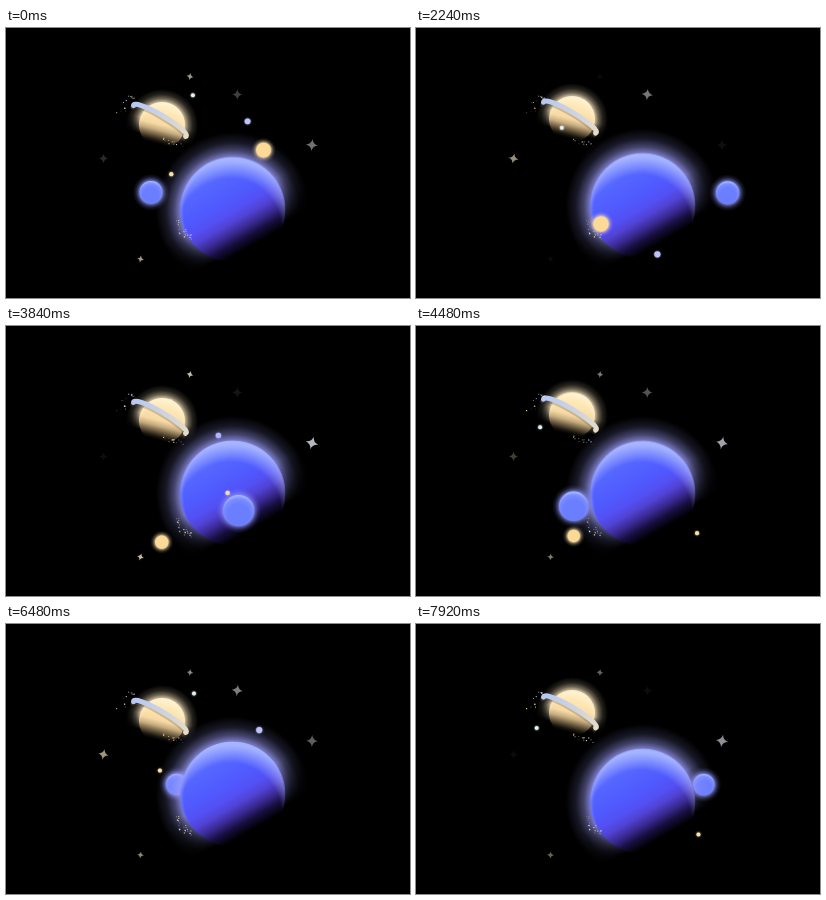
These frames come from a looping animation (404 px wide and 270 px high, 8 s). An HTML page with a canvas:

```html
<!DOCTYPE html>
<html lang="en">
<head>
<meta charset="utf-8">
<title>Planets</title>
<style>
html, body { margin: 0; width: 100%; height: 100%; overflow: hidden; background: #000; }
canvas { display: block; width: 404px; height: 270px; }
</style>
</head>
<body>
<canvas id="c" width="404" height="270"></canvas>
<script>
const ctx = document.getElementById('c').getContext('2d');
const { PI, sin, cos, max, abs } = Math;
const TAU = 2 * PI, LOOP = 8, STEP = 0.08;

function fillStops(g, stops) {
  for (const [at, color] of stops) g.addColorStop(at, color);
  return g;
}

function disc(c, x, y, r, fill) {
  c.fillStyle = fill;
  c.beginPath();
  c.arc(x, y, r, 0, TAU);
  c.fill();
}

function halo(c, x, y, r, reach, rgb, alpha) {
  const g = c.createRadialGradient(x, y, r * 0.97, x, y, r + reach);
  disc(c, x, y, r + reach, fillStops(g, [
    [0, `rgba(${rgb},${alpha})`], [0.3, `rgba(${rgb},${alpha * 0.5})`],
    [0.6, `rgba(${rgb},${alpha * 0.18})`], [1, `rgba(${rgb},0)`]
  ]));
}

// Gradient across a disc of radius r at the origin, along direction (nx, ny)
const across = (c, r, nx, ny, stops) =>
  fillStops(c.createLinearGradient(-nx * r, -ny * r, nx * r, ny * r), stops);

// Prerendered sphere: halo kept on the lit side, opaque body, soft rim
function sphere({ r, reach, dir, rgb, glow, body, rim, night }) {
  const half = Math.ceil(r + reach) + 2;
  const layer = document.createElement('canvas');
  layer.width = layer.height = half * 2;
  const c = layer.getContext('2d');
  c.translate(half, half);
  halo(c, 0, 0, r, reach, rgb, glow);
  c.globalCompositeOperation = 'destination-in';
  c.fillStyle = across(c, r, ...dir, [[0, '#000'], [0.45, '#000'], [night, 'transparent']]);
  c.fillRect(-half, -half, half * 2, half * 2);
  c.globalCompositeOperation = 'source-over';
  disc(c, 0, 0, r, across(c, r, ...dir, body));
  c.globalCompositeOperation = 'source-atop';
  for (const [dx, dy, inner, outer, rgba] of rim) {
    const g = c.createRadialGradient(dx, dy, inner, dx, dy, outer);
    const clear = rgba.replace(/[^,]+\)$/, '0)');
    disc(c, 0, 0, r, fillStops(g, [[0, clear], [1, rgba]]));
  }
  return (x, y) => ctx.drawImage(layer, x - half, y - half);
}

const drawPlanet = sphere({
  r: 52.5, reach: 25, dir: [0.5, 0.866], rgb: '160,160,255', glow: 0.85, night: 0.85,
  body: [[0, '#6c7dff'], [0.2, '#5566ff'], [0.4, '#505aff'], [0.52, '#5450f4'],
    [0.61, '#5142d2'], [0.7, '#3a2a92'], [0.79, '#180f40'], [0.89, '#000']],
  rim: [[-3, 21, 52, 70, 'rgba(178,192,255,0.85)'], [5, 4, 54, 59.5, 'rgba(170,180,255,0.6)']]
});

const drawSaturn = sphere({
  r: 23, reach: 13, dir: [-0.25, 0.97], rgb: '255,235,195', glow: 0.85, night: 0.8,
  body: [[0, '#fff0c8'], [0.3, '#fde4b0'], [0.5, '#f6d9a4'], [0.62, '#c8ad80'],
    [0.74, '#6c5c42'], [0.85, '#1a150e'], [0.92, '#000']],
  rim: [[-1, 5, 20, 29, 'rgba(255,246,220,0.6)']]
});

function drawRing(y) {
  ctx.save();
  ctx.translate(154, y);
  ctx.rotate(0.53);
  const arc = (dy, width, style) => {
    ctx.strokeStyle = style;
    ctx.lineWidth = width;
    ctx.beginPath();
    ctx.ellipse(0, dy, 30.5, 5.5, 0, PI - 0.1, TAU + 0.15);
    ctx.stroke();
  };
  ctx.lineCap = 'round';
  arc(2.5, 4, 'rgba(110,95,75,0.3)');
  arc(0, 5, fillStops(ctx.createLinearGradient(-32, 0, 32, 0), [
    [0, '#b6c8f4'], [0.35, '#c6d0e8'], [0.7, '#d4d6dc'], [1, '#e6dcc6']]));
  ctx.restore();
}

function drawBlue(x, y, r) {
  halo(ctx, x, y, r, 7, '140,150,255', 0.85);
  const g = ctx.createRadialGradient(x, y + r * 0.3, r * 0.7, x, y + r * 0.2, r * 1.2);
  disc(ctx, x, y, r, fillStops(g, [[0, '#6a7eff'], [0.6, '#7b8dff'], [1, '#acbcff']]));
}

function drawGold(x, y, r) {
  halo(ctx, x, y, r, 5, '255,226,170', 0.8);
  disc(ctx, x, y, r, '#fcd997');
}

function drawDot(x, y, r, color, rgb) {
  halo(ctx, x, y, r, 2, rgb, 0.4);
  disc(ctx, x, y, r, color);
}

function star(x, y, size, rgb, k) {
  const s = size * (0.85 + 0.15 * k), q = s * 0.14;
  ctx.save();
  ctx.translate(x, y);
  ctx.rotate(0.3 * max(0, k - 0.4) / 0.6);
  ctx.fillStyle = `rgba(${rgb},${0.05 + 0.78 * k})`;
  ctx.beginPath();
  ctx.moveTo(0, -s);
  for (const [cx, cy, ex, ey] of [[q, -q, s, 0], [q, q, 0, s], [-q, q, -s, 0], [-q, -q, 0, -s]])
    ctx.quadraticCurveTo(cx, cy, ex, ey);
  ctx.fill();
  ctx.restore();
}

// x, y, size, colour, period, time of the peak
const stars = [
  [184, 48.5, 3.6, '232,226,205', 3.3, 0.5],
  [231.3, 66.5, 6, '215,218,218', 4.3, 1.35],
  [306, 117, 6.5, '225,230,236', 3.3, 0.75],
  [97.5, 130.5, 5.4, '235,220,190', 4.3, 1.55],
  [134.5, 231, 3.6, '240,228,190', 3.3, 0.5]
];

function random(seed) {
  return () => (seed = (seed * 16807) % 2147483647) / 2147483647;
}

// Dust scattered along short lines: start, end, spread, count
const rnd = random(91);
const dust = [
  [109, 83, 120, 81, 2, 5], [116, 72, 128, 68, 2.5, 9],
  [158, 112, 180, 116, 2.5, 13], [170, 190, 173, 204, 3, 10], [176, 203, 187, 209, 4, 12]
].flatMap(([x0, y0, x1, y1, spread, n]) => Array.from({ length: n }, () => {
  const u = rnd();
  return {
    x: x0 + (x1 - x0) * u + (rnd() - 0.5) * spread,
    y: y0 + (y1 - y0) * u + (rnd() - 0.5) * 2 * spread,
    size: 0.7 + rnd() * 0.7, phase: rnd() * TAU, rate: 2 + rnd() * 2,
    color: rnd() < 0.5 ? '#f4dca0' : '#e6e8f6'
  };
}));

function drawDust(t) {
  for (const p of dust) {
    ctx.globalAlpha = 0.55 + 0.4 * sin(p.phase + p.rate * t);
    ctx.fillStyle = p.color;
    ctx.fillRect(p.x, p.y, p.size, p.size);
  }
  ctx.globalAlpha = 1;
}

// Smooth curve through [time, value] points; the end points only set slopes
function through(pts, t) {
  let i = 1;
  while (i < pts.length - 3 && t > pts[i + 1][0]) i++;
  const slope = j => (pts[j + 1][1] - pts[j - 1][1]) / (pts[j + 1][0] - pts[j - 1][0]);
  const [t0, a] = pts[i], [t1, b] = pts[i + 1], h = t1 - t0, u = (t - t0) / h;
  return a + (b - a) * u * u * (3 - 2 * u) +
    h * u * (1 - u) * (slope(i) * (1 - u) - slope(i + 1) * u);
}

const blueTurn = [[-1.52, 2.4], [0, 3.66], [0.48, 4.07], [1.92, 5.4], [2.24, 5.8],
  [3.2, 6.86], [4.48, 8.68], [6, 9.943], [6.48, 10.353]];

function blueMoon(t) {
  const a = through(blueTurn, t % 6), s = sin(a);
  return { front: s > 0, draw: () => drawBlue(227.5 + 95 * cos(a), 171 + 13.5 * s, 12.7 + 2.7 * s) };
}

function goldMoon(t) {
  let a = 0.592 * (t - 4);
  if (a > 0) a -= 0.11 * a * a;
  const s = sin(a);
  return {
    front: s < 0,
    draw: () => drawGold(215 - 59.5 * cos(a), 156.3 + 59 * cos(a) - 11.4 * s, 6.5 - 1.2 * s)
  };
}

const SPIN = TAU / 3.35;
// Angle since the far end, running late (or early) by skew on the opposite side
function turn(t, start, skew) {
  const a = SPIN * (t - start);
  return a + skew * (1 - cos(a));
}

function lilacDot(t) {
  const a = turn(t, 0.1, -0.13), s = sin(a), k = cos(a);
  return {
    front: s < 0,
    draw: () => drawDot(227.5 - 33 * s + 8 * k, 167 - 75 * k, 2.9 - 0.3 * s, '#bcc2fa', '190,190,255')
  };
}

function amberDot(t) {
  const a = turn(t, -0.33, 0.1), s = sin(a), k = cos(a);
  return {
    front: s > 0,
    draw: () => drawDot(217.5 - 65 * k, 180 - 31 * k - 15 * s, 2 + 0.2 * s, '#f6e2ac', '250,220,150')
  };
}

function paleDot(t) {
  const a = turn(t, -0.15, 0.04), s = sin(a), k = cos(a);
  return {
    front: s < 0 || k < -0.5,
    draw: () => drawDot(152.3 + 36 * k, 89.2 - 20.8 * k - 7 * s, 2, '#e2f0f2', '210,235,240')
  };
}

function layered(bodies, middle) {
  bodies.filter(b => !b.front).forEach(b => b.draw());
  middle();
  bodies.filter(b => b.front).forEach(b => b.draw());
}

// Bob between 0 and 1 with a cubic ease
function bob(t, period) {
  const u = 1 - abs(1 - 2 * ((t / period) % 1));
  return u < 0.5 ? 4 * u ** 3 : 1 - 4 * (1 - u) ** 3;
}

function render(t) {
  ctx.fillStyle = '#000';
  ctx.fillRect(0, 0, 404, 270);

  for (const [x, y, size, rgb, period, peak] of stars)
    star(x, y, size, rgb, 0.5 + 0.5 * cos(TAU * (t - peak) / period));

  const lift = bob(t, 3.2);
  layered([paleDot(t)], () => {
    drawSaturn(156, 97 - 8 * lift);
    drawRing(92.5 - 4.5 * lift);
  });

  const planetY = 173.5 + 8.3 * cos(TAU * (t - 2.72) / 2.85);
  layered([lilacDot(t), amberDot(t), goldMoon(t), blueMoon(t)],
    () => drawPlanet(226.7, planetY));

  drawDust(t);
}

const start = performance.now();
function tick() {
  const t = ((performance.now() - start) / 1000) % LOOP;
  render(Math.floor(t / STEP + 1e-6) * STEP);
  requestAnimationFrame(tick);
}
tick();
</script>
</body>
</html>
```
